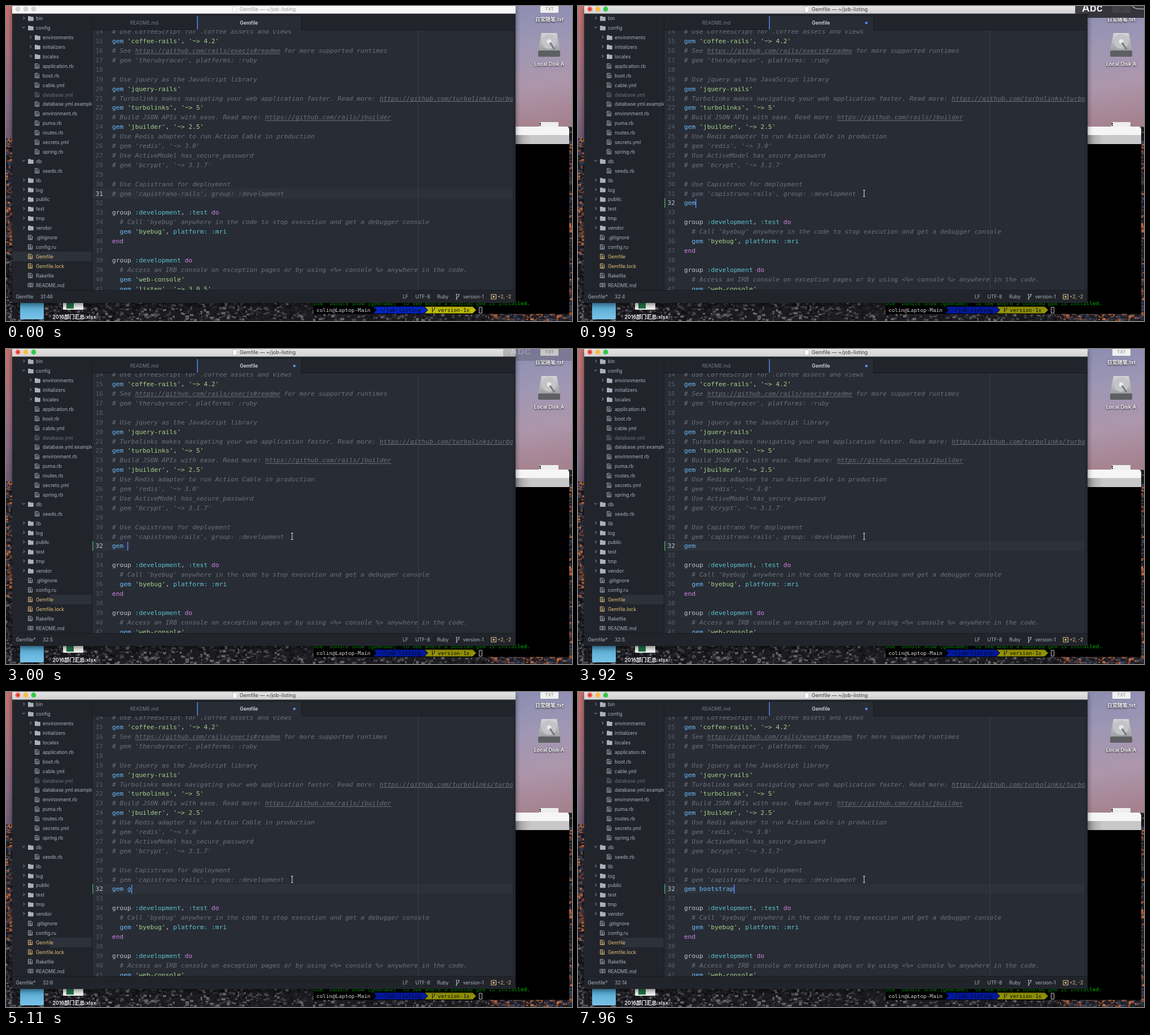
An HTML page with a canvas for the animation above (8000 ms loop, 1003 by 559 pixels).

```html
<!DOCTYPE html>
<html lang="en">
<head>
<meta charset="utf-8">
<title>Editing a Gemfile</title>
<style>
html, body { margin: 0; width: 100%; height: 100%; overflow: hidden; background: #111; }
canvas { display: block; }
</style>
</head>
<body>
<canvas id="stage" width="1003" height="559"></canvas>
<script>
const ctx = document.getElementById('stage').getContext('2d');
const LOOP = 8000;
const MONO = '"DejaVu Sans Mono", monospace';
const UI = 'Inter, "Noto Sans CJK SC", "Noto Sans CJK", sans-serif';
const CODE_SIZE = 11.25, CODE_X = 188, LINE_H = 16.9;
const C = {
  editor: '#282c34', panel: '#21252b', row: '#2c313a', edge: '#181a1f', text: '#bcc2cd', ui: '#a9b0be',
  dim: '#6a717e', blue: '#6bb9f7', green: '#a5d089', cyan: '#5dc1ce', purple: '#d083e6', amber: '#e2c08d'
};

const HEAD = `# Use CoffeeScript for .coffee assets and views
gem 'coffee-rails', '~> 4.2'
# See https://github.com/rails/execjs#readme for more supported runtimes
# gem 'therubyracer', platforms: :ruby

# Use jquery as the JavaScript library
gem 'jquery-rails'
# Turbolinks makes navigating your web application faster. Read more: https://github.com/turbolinks/turbolinks
gem 'turbolinks', '~> 5'
# Build JSON APIs with ease. Read more: https://github.com/rails/jbuilder
gem 'jbuilder', '~> 2.5'
# Use Redis adapter to run Action Cable in production
# gem 'redis', '~> 3.0'
# Use ActiveModel has_secure_password
# gem 'bcrypt', '~> 3.1.7'

# Use Capistrano for deployment
# gem 'capistrano-rails', group: :development`.split('\n');
const TAIL = `
group :development, :test do
  # Call 'byebug' anywhere in the code to stop execution and get a debugger console
  gem 'byebug', platform: :mri
end

group :development do
  # Access an IRB console on exception pages or by using <%= console %> anywhere in the code.
  gem 'web-console'
  gem 'listen', '~> 3.0.5'`.split('\n');

// Leading ">" closed folder, "v" open folder, "-" file; a space before it indents.
const TREE = `>bin
vconfig
 >environments
 >initializers
 >locales
 -application.rb
 -boot.rb
 -cable.yml
 -database.yml
 -database.yml.example
 -environment.rb
 -puma.rb
 -routes.rb
 -secrets.yml
 -spring.rb
vdb
 -seeds.rb
>lib
>log
>public
>test
>tmp
>vendor
-.gitignore
-config.ru
-Gemfile
-Gemfile.lock
-Rakefile
-README.md`.split('\n');

const TYPED = [
  [510, 'gem'], [1800, 'gem '], [4220, 'gem g'], [4370, 'gem go'], [4660, 'gem goo'],
  [4960, 'gem go'], [5110, 'gem g'], [5260, 'gem '], [5420, 'gem b'], [5570, 'gem bo'],
  [5720, 'gem boo'], [5870, 'gem boot'], [6320, 'gem boots'], [6470, 'gem bootst'],
  [6620, 'gem bootstr'], [6920, 'gem bootstra'], [7070, 'gem bootstrap']
];
const CURSOR_OFF = [[0, 990], [1440, 1800], [2400, 2700], [3140, 3590], [3920, 4220], [7520, 7960]];
const BADGE = [[0, 0], [750, 1], [2700, .75], [2850, .5], [3000, .25], [3140, 0]];

const within = (t, a, b) => t >= a && t < b;
const latest = (steps, t) => (steps.filter(s => s[0] <= t).pop() || [0, ''])[1];

function rect(x, y, w, h, fill) {
  ctx.fillStyle = fill;
  ctx.fillRect(x, y, w, h);
}
function round(x, y, w, h, radius, fill) {
  ctx.fillStyle = fill;
  ctx.beginPath();
  ctx.roundRect(x, y, w, h, radius);
  ctx.fill();
}
function circle(x, y, r, fill) {
  ctx.fillStyle = fill;
  ctx.beginPath();
  ctx.arc(x, y, r, 0, 7);
  ctx.fill();
}
function poly(points, fill) {
  ctx.fillStyle = fill;
  ctx.beginPath();
  points.forEach(p => ctx.lineTo(...p));
  ctx.fill();
}
function stroke(path, color, width = 1) {
  ctx.strokeStyle = color;
  ctx.lineWidth = width;
  ctx.stroke(new Path2D(path));
}
function fade(x0, y0, x1, y1, colors) {
  const g = ctx.createLinearGradient(x0, y0, x1, y1);
  colors.forEach((c, i) => g.addColorStop(i / (colors.length - 1), c));
  return g;
}
// y is the middle of the capitals.
function text(s, x, y, color, size = 8.5, { family = UI, style = '', align = 'left' } = {}) {
  ctx.font = `${style} ${size}px ${family}`;
  ctx.textAlign = align;
  ctx.fillStyle = color;
  ctx.fillText(s, x, y + size * .36);
}
function shadowed(color, blur, dy, draw) {
  ctx.save();
  ctx.shadowColor = color;
  ctx.shadowBlur = blur;
  ctx.shadowOffsetY = dy;
  draw();
  ctx.restore();
}
function clipped(x, y, w, h, draw) {
  ctx.save();
  ctx.beginPath();
  ctx.rect(x, y, w, h);
  ctx.clip();
  draw();
  ctx.restore();
}
const label = (s, x, y) => shadowed('#000', 3, 1, () =>
  text(s, x, y, '#fff', 9, { style: '600', align: 'center' }));

let seed = 7;
const rand = () => (seed = seed * 16807 % 2147483647) / 2147483647;

function rocks(x, y, w, h, count, colors) {
  clipped(x, y, w, h, () => {
    for (let i = 0; i < count; i++) {
      const color = colors[rand() * colors.length | 0];
      rect(x - 3 + rand() * w, y - 2 + rand() * h, 2 + rand() * 5, 1 + rand() * 4, color);
    }
  });
}

function wallpaper() {
  seed = 7;
  rect(0, 0, 1003, 559, '#1c1c20');
  rect(0, 0, 12, 250, fade(0, 0, 0, 250, ['#c4716f', '#a9707c', '#8a6a80', '#6a5a74']));
  rect(903, 0, 100, 215, fade(903, 0, 940, 215, ['#8d8db2', '#9e97b4', '#ad96ab', '#a5818e']));
  const ridge = ['#20263a', '#34405a', '#8c4a30', '#c0683a', '#17181f', '#4a3a40'];
  const stones = ['#101014', '#1b1c22', '#2b2c33', '#46464c', '#68666a', '#141418'];
  rocks(0, 235, 12, 210, 260, ridge);
  rocks(997, 214, 6, 345, 220, ridge);
  rocks(0, 440, 12, 119, 150, stones);
  rocks(0, 524, 860, 35, 1700, stones);
  rocks(850, 545, 153, 14, 220, ridge);
}

function desktop() {
  round(947, -20, 32, 32, 1, '#f1f1f1');
  text('TXT', 963, 5.5, '#888', 8, { align: 'center' });
  label('日常随笔.txt', 963, 23.5);
  poly([[949, 48], [976, 48], [982, 80], [943, 80]], fade(0, 48, 0, 80, ['#d6d6d8', '#9c9da0']));
  round(943, 79, 39, 11, 2, '#5e5f63');
  circle(962.5, 63, 13, '#c3c4c7');
  circle(962.5, 63, 4, '#e9e9ea');
  stroke('M964 65L972 77', '#77787c', 3);
  label('Local Disk A', 962.5, 102.5);
  round(945, 206, 34, 12, 1, '#eee');
  text('t', 945, 210, '#111', 9, { style: '700' });
  round(25, 520, 42, 36, 2, fade(0, 527, 0, 556, ['#50a6d0', '#7ac3e7']));
  rect(101, 520, 36, 19, '#f0f2f0');
  rect(107, 526, 13, 11, '#217346');
  label('2016部门汇总.xlsx', 121, 552);
}

function terminal(active) {
  rect(545, 500, 453, 46.5, '#000');
  rect(900, 229, 98, 317, '#000');
  round(880, 214, 118, 20, [0, 5, 0, 0], '#f5f5f5');
  rect(900, 229, 98, 16, fade(903, 0, 930, 0, ['#8c8c8c', '#b2b2b2', '#c8c8c8']));
  const mono = { family: MONO };
  text('Use `bundle show [gemname]` to see where a bundled gem is installed.', 545, 527.5, '#00c200', 9.4, mono);
  text('colin@Laptop-Main', 550, 539.5, '#d6d6d6', 9.4, mono);
  const segment = (x, end, fill) =>
    poly([[x, 533.5], [end, 533.5], [end + 6, 539.5], [end, 545.5], [x, 545.5], [x + 6, 539.5]], fill);
  segment(651, 741, active ? '#0225c7' : '#0219a0');
  segment(742, 827, active ? '#bcbc0a' : '#929208');
  text('~/job-listing', 662, 539.5, '#050510', 9.4, mono);
  stroke('M755.5 535V544M759.5 535V538Q759 540 755.5 541.5', '#111');
  text('version-1±', 765, 539.5, '#0a0a00', 9.4, mono);
  stroke('M838.5 534.5H843.5V545H838.5Z', '#c8c8c8');
}

function sidebar(t) {
  rect(12, 13, 140, 491, C.panel);
  if (!within(t, 510, 1800)) {
    const left = t < 510 ? 12 : 78;
    rect(left, 436, 152 - left, 17, C.row);
  }
  clipped(12, 13, 140, 491, () => TREE.forEach((entry, i) => {
    const depth = entry[0] === ' ' ? 1 : 0, kind = entry[depth], name = entry.slice(depth + 1);
    const x = 39 + depth * 12, y = 22 + i * LINE_H;
    const color = name === 'database.yml' ? C.dim : /^Gemfile/.test(name) ? '#e5c07b' : C.ui;
    if (kind === '-') {
      if (name === 'README.md') {
        stroke(`M${x} ${y - 3}h9v6h-9zM${x + 4.5} ${y - 3}v7M${x + 1.5} ${y - 1}h2m2 0h2m-6 2h2m2 0h2`, color, .9);
      } else {
        stroke(`M${x + .5} ${y - 4}h5l2 2v6h-7zM${x + 2} ${y - 1.5}h3m-3 2h4m-4 2h4`, color);
      }
    } else {
      round(x, y - 4, 4.8, 3, 1, color);
      round(x, y - 2.8, 9.8, 7.2, .7, color);
      stroke(kind === 'v' ? `M${x - 10} ${y - 2}l2.2 2.2l2.2 -2.2` : `M${x - 8.5} ${y - 3}l2.4 2.4l-2.4 2.4`, color);
    }
    text(name, x + 14, y + .3, color);
  }));
  rect(152, 17, 1, 487, C.edge);
}

function codeLine(line, y) {
  const isComment = /^\s*#/.test(line);
  const pattern = isComment ? /https:\S+|(?:(?!https:).)+/g : /'[^']*'|:\w+|\w+:|\w+|[^\w':]+/g;
  ctx.font = `${CODE_SIZE}px ${MONO}`;
  const advance = ctx.measureText('0').width;
  for (const { 0: token, index } of line.matchAll(pattern)) {
    const x = CODE_X + index * advance;
    const color = isComment ? C.dim
      : token[0] === "'" ? C.green
      : /^:|:$/.test(token) ? C.cyan
      : /^(do|end)$/.test(token) ? C.purple
      : /^(gem|g|go|goo|b\w*)$/.test(token) ? C.blue : C.text;
    text(token, x, y, color, CODE_SIZE, { family: MONO, style: isComment ? 'italic' : '' });
    if (isComment && token.startsWith('https:')) rect(x, y + 5.5, token.length * advance, 1, C.dim);
  }
  return CODE_X + line.length * advance;
}

function editor(t, typed) {
  const active = t >= 510, composing = within(t, 510, 750);
  const lines = [...HEAD, ...(active ? [typed] : []), ...TAIL];
  const current = active ? 32 : 31;
  rect(153, 43, 750, 461, C.editor);
  clipped(153, 43, 745, 461, () => {
    if (!active) rect(153, 324, 745, 17, C.row);
    if (t >= 1800) rect(153, 341, t < 3140 ? 64 : 745, 17, C.row);
    if (composing) rect(CODE_X, 342, 21, 15, '#3d4c61');
    rect(730, 43, 1, 461, '#3a3f48');
    lines.forEach((line, i) => {
      const number = i + 14, y = 45.2 + i * LINE_H;
      text(number, 172, y, number === current ? C.text : '#545c6c', CODE_SIZE, { family: MONO, align: 'right' });
      const end = codeLine(line, y);
      if (active && number === current && !CURSOR_OFF.some(([a, b]) => within(t, a, b))) {
        rect(Math.round(end), 342, 1.5, 16, '#528bff');
      }
    });
  });
  if (active) rect(152.5, composing ? 358 : 341, 2, 17, '#43a06c');
  rect(898, 43, 5, 461, '#24282f');
}

function tabs(t) {
  rect(153, 13, 750, 30, C.panel);
  rect(153, 42, 750, 1, C.edge);
  rect(339, 18, 184, 25, C.editor);
  rect(338.5, 18, 1.5, 24, '#568af2');
  rect(523, 18, 1, 24, C.edge);
  text('README.md', 245, 30, '#757c89', 8.5, { align: 'center' });
  text('Gemfile', 430.5, 30, '#d7dae0', 8.5, { style: '600', align: 'center' });
  if (t >= 510) circle(511, 30, 2.3, '#568af2');
}

function titleBar(active) {
  round(11, -8, 892, 21.5, 0, active ? fade(0, 0, 0, 13, ['#e4e4e4', '#d2d2d2']) : '#f6f6f6');
  ['#fc5b57', '#fdbc40', '#34c84a'].forEach((c, i) => circle(21 + i * 14, 5.5, 4.4, active ? c : '#d2d2d2'));
  if (active) circle(21, 5.5, 1.3, '#8c1512');
  ctx.globalAlpha = active ? 1 : .5;
  rect(402, 1, 7, 10, '#fff');
  stroke('M402 1H406.5L409 3.5V11H402Z', '#aaa', .7);
  ctx.globalAlpha = 1;
  text('Gemfile — ~/job-listing', 414, 6, active ? '#3c3c3c' : '#9c9c9c', 9.1);
}

function statusBar(t, typed) {
  const y = 516, active = t >= 510;
  round(11, 504, 892, 23, [0, 0, 4, 4], C.panel);
  rect(11, 504, 892, 1, C.edge);
  text(active ? 'Gemfile*' : 'Gemfile', 17.5, y, C.ui);
  text(active ? '32:' + (typed.length + 1) : '31:46', active ? 65 : 61, y, C.ui);
  if (within(t, 510, 750)) text('(1, 3)', 96, y, C.ui);
  text('LF', 703, y, C.ui);
  text('UTF-8', 725.5, y, C.ui);
  text('Ruby', 764, y, C.ui);
  stroke('M798.5 513V519M802.5 513V514Q802.5 516 798.5 517.5', C.ui, 1.1);
  [[798.5, 512], [798.5, 520], [802.5, 512]].forEach(p => circle(...p, 1.2, C.ui));
  text('version-1', 810, y, C.ui);
  stroke('M860 512H868.5V520H860Z', C.amber, 1.1);
  circle(864.2, 516, 1.8, C.amber);
  text('+2, -2', 871, y, C.amber);
}

function candidates() {
  shadowed('rgba(0,0,0,.5)', 6, 2, () => round(180.5, 361, 248, 24, 4, fade(0, 361, 0, 385, ['#e6e6e6', '#d2d2d2'])));
  const cjk = { family: '"Noto Sans CJK SC", "Noto Sans CJK", sans-serif' };
  [['1.靓', 188], ['2.青山m', 216], ['3.青峰t', 266], ['4.表内w', 311], ['5.敷贴h', 360]].forEach(([s, x], i) =>
    text(s, x, 373, i ? '#949494' : '#2b2b2b', 12, cjk));
  stroke('M410.5 372l-3 2.7l3 2.7', '#8a8a8a', 1.2);
  stroke('M416.5 372l3 2.7l-3 2.7', '#222', 1.5);
}

function completion() {
  shadowed('rgba(0,0,0,.5)', 5, 2, () => round(184, 358.5, 174, 23, 2, '#3a3f4b'));
  rect(185, 359.5, 22, 21, '#4d5a4c');
  stroke('M190 370H198M195 367l3.2 3l-3.2 3M200.5 366V374', C.green, 1.5);
  const mono = { family: MONO };
  text('g', 215, 370, '#fff', CODE_SIZE, { ...mono, style: 'bold' });
  text('re', 222, 370, '#d7dae0', CODE_SIZE, mono);
  text('grep(/pattern/) …', 245.5, 370, '#8f97a6', 10.2, mono);
}

function inputBadge(alpha) {
  ctx.globalAlpha = alpha;
  round(881, -80, 140, 101, 10, 'rgba(38,36,40,.85)');
  text('Abc', 893, 3.5, '#f2f2f2', 19, { style: '600' });
  stroke('M981 -2Q985 7 1003 5', '#aaa', 1.5);
  ctx.globalAlpha = 1;
}

function draw(now) {
  const t = now % LOOP, active = t >= 510, typed = latest(TYPED, t);
  wallpaper();
  desktop();
  terminal(!active);
  shadowed('rgba(0,0,0,.5)', 10, 3, () => round(11, 0, 892, 527, [0, 0, 4, 4], C.panel));
  editor(t, typed);
  sidebar(t);
  tabs(t);
  titleBar(active);
  statusBar(t, typed);
  if (within(t, 510, 750)) candidates();
  if (within(t, 4220, 4520)) completion();
  if (active) {
    const beam = 'M505 326.5Q507 326.5 507 328Q507 326.5 509 326.5M507 328V337M505 338.5Q507 338.5 507 337Q507 338.5 509 338.5';
    stroke(beam, '#111', 2.4);
    stroke(beam, '#eee', 1.1);
  }
  inputBadge(latest(BADGE, t));
  requestAnimationFrame(draw);
}
requestAnimationFrame(draw);
</script>
</body>
</html>
```
